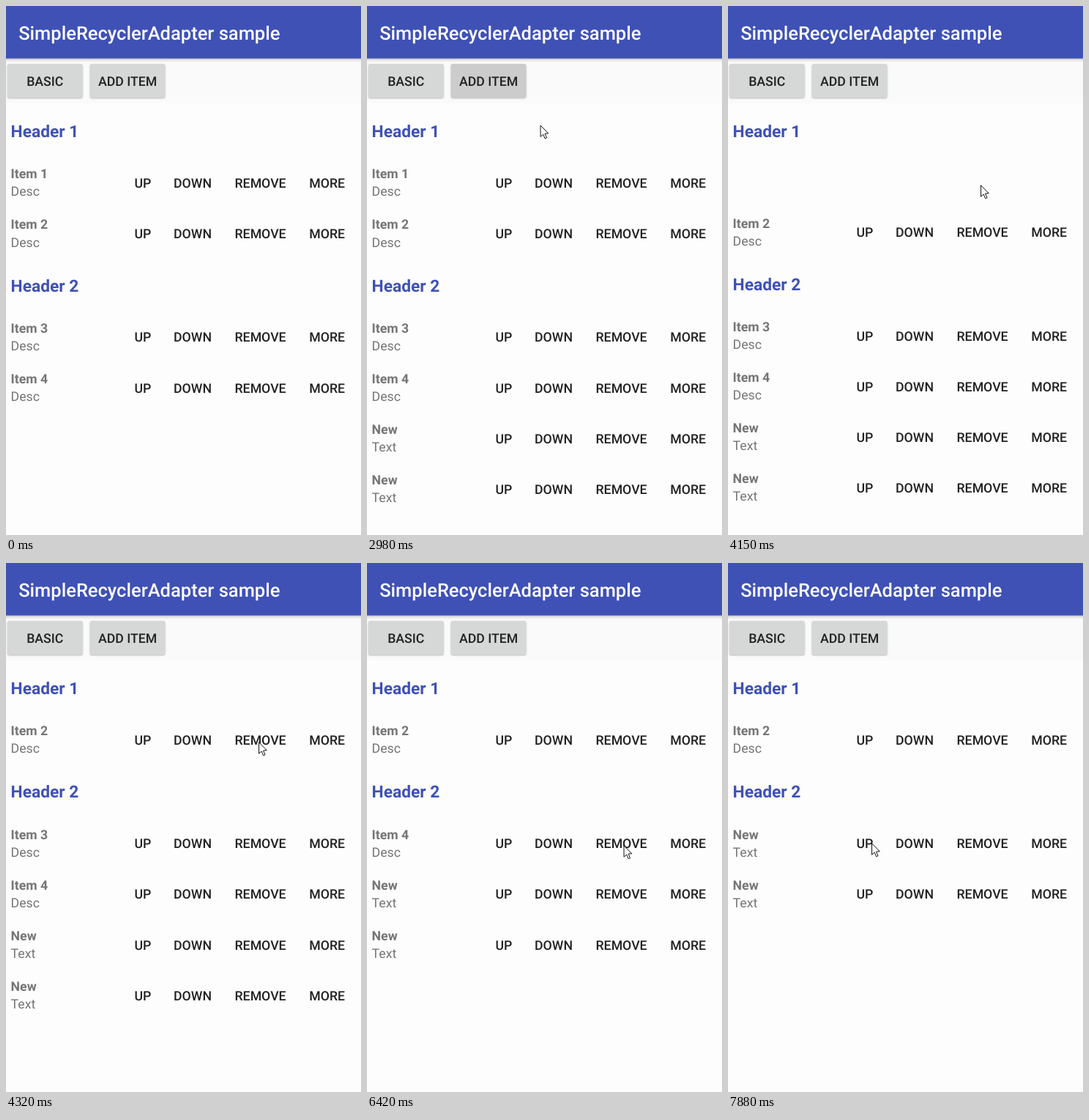
Animation of 485 by 722 pixels, one loop 8 s. Source, as an HTML page:

```html
<!DOCTYPE html>
<html lang="en">
<head>
<meta charset="utf-8">
<title>SimpleRecyclerAdapter sample</title>
<style>
html, body { margin: 0; width: 100%; height: 100%; overflow: hidden; background: #fdfdfd; }
svg { display: block; width: 485px; height: 722px; font-family: Roboto, sans-serif; text-rendering: geometricPrecision; }
.title { font-size: 25.5px; font-weight: 500; fill: #fff; }
.header { font-size: 22.75px; font-weight: 700; fill: #3f51b5; }
.name { font-size: 17.7px; font-weight: 700; fill: #757575; }
.desc { font-size: 17.7px; fill: #757575; }
.btn { font-size: 17.7px; font-weight: 500; fill: #212121; text-anchor: middle; }
</style>
</head>
<body>
<svg viewBox="0 0 485 722">
  <defs>
    <linearGradient id="shade" x2="0" y2="1">
      <stop offset="0" stop-color="#000" stop-opacity=".3"/>
      <stop offset=".4" stop-color="#000" stop-opacity=".1"/>
      <stop offset="1" stop-color="#000" stop-opacity="0"/>
    </linearGradient>
  </defs>
  <rect width="485" height="722" fill="#fdfdfd"/>
  <rect y="71" width="485" height="62" fill="#fafafa"/>
  <rect y="71" width="485" height="6" fill="url(#shade)"/>
  <rect width="485" height="71.5" fill="#3f51b5"/>
  <text class="title" x="17.2" y="46">SimpleRecyclerAdapter sample</text>
  <g id="bar"></g>
  <g id="list"></g>
  <path id="cursor" d="M.5 .7V16.2L4.1 12.9 6.6 18.7 9 17.7 6.5 12 11.2 11.6Z" fill="#fff" stroke="#111"/>
</svg>
<script>
const LOOP = 8000;
const FIRST_TICK = 180, TICK = 77.9; // the screen refreshes in even steps
const FADE = 120, SLIDE = 250;
const LIST_TOP = 133, HEADER_H = 72.3, ROW_H = 69.1;
const POINTER_LEAVES = 2970;

const rows = [
  { header: "Header 1" },
  { name: "Item 1", desc: "Desc", removed: 3929 },
  { name: "Item 2", desc: "Desc" },
  { header: "Header 2" },
  { name: "Item 3", desc: "Desc", removed: 5704 },
  { name: "Item 4", desc: "Desc", removed: 6645 },
  { name: "New", desc: "Text", added: 1225 },
  { name: "New", desc: "Text", added: 2225 }
];
const clicks = rows.map(row => row.added).filter(Boolean);

// Where the pointer comes to rest: arrival time, x, y
const entry = [402, 728];
const stops = [
  [970, 190, 119], [3290, 359, 276], [3450, 350, 253],
  [3770, 345, 244], [5570, 356.5, 388], [6420, 350.5, 385],
  [7040, 278, 348], [7340, 266, 366], [7815, 196, 382]
];

const byId = id => document.getElementById(id);

function add(parent, tag, attrs, text) {
  const el = document.createElementNS("http://www.w3.org/2000/svg", tag);
  for (const key in attrs) el.setAttribute(key, attrs[key]);
  if (text) el.textContent = text;
  return parent.appendChild(el);
}

function barButton(x, label) {
  const width = 102.5;
  const box = add(byId("bar"), "rect", { x, y: 79, width, height: 46, rx: 2.5, fill: "#d6d7d7" });
  add(byId("bar"), "text", { class: "btn", x: x + width / 2, y: 109.3 }, label);
  box.style.filter = "drop-shadow(0 1px 1px rgba(0,0,0,.28))";
  return box;
}

function buildRow(row) {
  row.el = add(byId("list"), "g", {});
  if (row.header) {
    add(row.el, "text", { class: "header", x: 6.6, y: 46 }, row.header);
    return;
  }
  row.glow = add(row.el, "rect", { x: 302, y: 17, width: 91, height: 36, rx: 2.5, fill: "#f1f1f1" });
  add(row.el, "text", { class: "name", x: 6.6, y: 30 }, row.name);
  add(row.el, "text", { class: "desc", x: 6.6, y: 54.2 }, row.desc);
  const labels = { UP: 187, DOWN: 255, REMOVE: 347.6, MORE: 438.7 };
  for (const label in labels) add(row.el, "text", { class: "btn", x: labels[label], y: 42.7 }, label);
}

barButton(2, "BASIC");
const addItem = barButton(114.8, "ADD ITEM");
rows.forEach(buildRow);

function ease(t, start, length) {
  const p = Math.min(1, Math.max(0, (t - start) / length));
  return (1 - Math.cos(Math.PI * p)) / 2;
}

// Longer ways take more time, but less than in proportion
function drawCursor(t) {
  let [x, y] = entry, [fromX, fromY] = entry;
  for (const [arrival, toX, toY] of stops) {
    const length = 60 + 35 * Math.sqrt(Math.hypot(toX - fromX, toY - fromY));
    const k = ease(t, arrival - length, length);
    x += (toX - x) * k;
    y += (toY - y) * k;
    [fromX, fromY] = [toX, toY];
  }
  byId("cursor").setAttribute("transform", `translate(${x} ${y})`);
  byId("cursor").setAttribute("visibility", t < FIRST_TICK ? "hidden" : "visible");
}

function drawBar(t) {
  const pressed = clicks.some(click => Math.abs(t - click - 40) < 80);
  const dark = t > clicks[0] - 40 && t < POINTER_LEAVES;
  addItem.style.filter = pressed
    ? "drop-shadow(0 2.5px 2px rgba(0,0,0,.36))"
    : "drop-shadow(0 1px 1px rgba(0,0,0,.28))";
  addItem.setAttribute("fill", dark ? "#cccccc" : "#d6d7d7");
}

function drawList(t) {
  let y = LIST_TOP;
  for (const row of rows) {
    const { added = -FADE, removed = Infinity } = row;
    row.el.setAttribute("transform", `translate(0 ${y})`);
    row.el.setAttribute("opacity", ease(t, added, FADE) * (1 - ease(t, removed, FADE)));
    if (row.glow) row.glow.setAttribute("visibility", t > removed ? "visible" : "hidden");
    y += (row.header ? HEADER_H : ROW_H) * (1 - ease(t, removed + FADE, SLIDE));
  }
}

function draw(time) {
  const t = time < FIRST_TICK ? 0 : FIRST_TICK + TICK * Math.floor((time - FIRST_TICK) / TICK);
  drawBar(t);
  drawList(t);
  drawCursor(t);
}

const begin = performance.now();
function tick() {
  draw((performance.now() - begin) % LOOP);
  requestAnimationFrame(tick);
}
tick();
</script>
</body>
</html>
```
